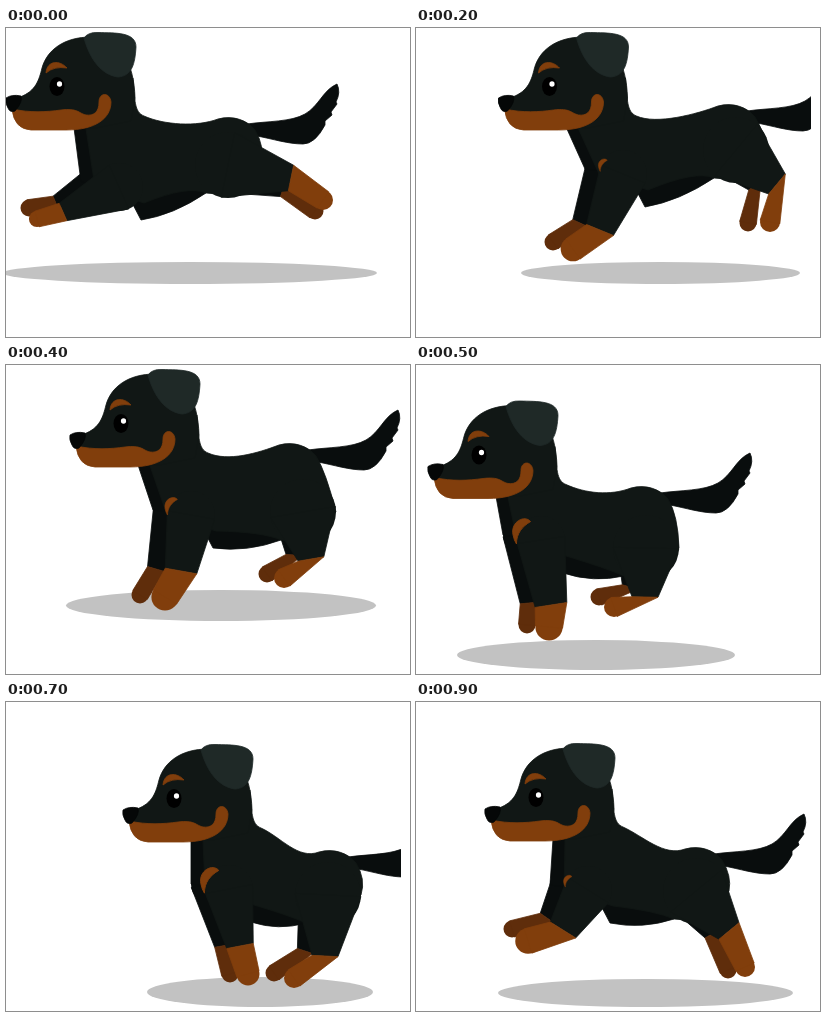
These frames come from a looping animation (404x309 px, 1000 ms). An HTML page with a canvas:

```html
<!DOCTYPE html>
<html lang="en">
<head>
<meta charset="utf-8">
<title>Running puppy</title>
<style>
html, body { margin: 0; width: 100%; height: 100%; overflow: hidden; background: #fff; }
canvas { display: block; }
</style>
</head>
<body>
<canvas id="stage" width="404" height="309"></canvas>
<script>
const ctx = document.getElementById('stage').getContext('2d');
const COAT = '#111715', SHADE = '#090d0d', EAR = '#1f2927', TAN = '#813e0c', DARK_TAN = '#5f2d0b';

// Rigid parts: the face is placed by the head, the tail by the rump.
const FACE = [
  ['M0,71 Q6,67 14,69 C30,63 33,52 36,40 C41,22 58,9 85,9 C115,10 128,35 129,70 L125,93 L90,100 L20,96Z', COAT],
  ['M6,81 Q8,101 25,102 L60,102 C90,102 105,90 105,74 C104,64 93,64 93,74 C93,84 88,88 80,87 C72,85 72,80 55,82 C40,84 25,85 6,81Z', TAN],
  ['M0,70 Q6,66 15,68 Q17,74 9,83 Q4,85 2,80 Q-1,75 0,70Z', '#050707'],
  ['M78,10 Q82,4 92,4.5 C110,5 130,4 130,19 C129,36 126,48 112,49 C96,47 84,32 78,10Z', EAR],
  ['M40,45 C41,32 54,32 61,40 Q48,38 40,45Z', TAN],
];
const TAIL = 'M-6,0 C15,-3 38,-2 52,-10 C66,-18 70,-34 84,-40 Q88,-32 83,-22 l1,2 -6,8 1,3 -7,6 0,4 Q62,20 50,20 C35,20 20,15 4,12Z';
const PATCH = 'M9,-8 C4,-14 -8,-8 -6,3 Q-5,8 -3,11 C-3,2 2,-4 9,-8Z';

// Joints of each key pose; farHand and farFoot shift the far legs from the near ones.
const leap = {
  head: [0, 0], rump: [247, 96], shoulder: [113, 159], hip: [222, 137],
  wrist: [57, 184], hand: [31, 191], farHand: [-8, -11], arm: [9.5],
  ankle: [285, 150], foot: [317, 172], farFoot: [-8, 11],
  shadow: [184, 245, 187, 11], edge: [404],
};
const reach = {
  head: [82.5, 0], rump: [337, 83], shoulder: [207, 146], hip: [320, 122],
  wrist: [184, 202], hand: [157, 221], farHand: [-20, -7], arm: [14.5],
  ankle: [361, 156], foot: [354, 194], farFoot: [-22, 1],
  shadow: [244.5, 245, 139.5, 11], edge: [395],
};
const land = {
  head: [64, 0], rump: [308, 85], shoulder: [185, 150], hip: [297, 147],
  wrist: [175, 206], hand: [159, 232], farHand: [-25, -2], arm: [16],
  ankle: [305, 194], foot: [278, 213], farFoot: [-17, -4],
  shadow: [215, 240.5, 155, 15.5], edge: [404],
};
const stand = {
  head: [12, 31.5], rump: [250, 128], shoulder: [125, 175], hip: [230, 183],
  wrist: [135, 240], hand: [133, 262], farHand: [-22, -2], arm: [16],
  ankle: [229, 232], foot: [198, 242], farFoot: [-15, -10],
  shadow: [180, 290, 139, 15], edge: [404],
};
const gather = {
  head: [75, 35], rump: [311, 151], shoulder: [180, 186], hip: [288, 195],
  wrist: [190, 249], hand: [196, 274], farHand: [-18, -1], arm: [13.5],
  ankle: [267, 247], foot: [236, 269], farFoot: [-14, -4],
  shadow: [221, 290, 139, 14.5], edge: [404],
};
const crouch = {
  head: [117, 38], rump: [348, 155], shoulder: [223, 187], hip: [322, 193],
  wrist: [234, 244], hand: [242, 272], farHand: [-18, 0], arm: [13.5],
  ankle: [319, 254], foot: [288, 276], farFoot: [-20, -5],
  shadow: [254, 290, 113, 15], edge: [395],
};
const spring = {
  head: [69, 37], rump: [304, 152], shoulder: [172, 188], hip: [280, 189],
  wrist: [147, 228], hand: [112, 239], farHand: [-16, -12], arm: [15],
  ankle: [313, 229], foot: [329, 265], farFoot: [-17, 3],
  shadow: [229.5, 291, 147.5, 14], edge: [404],
};

function between(a, b) {
  const mid = {};
  for (const key in a) mid[key] = a[key].map((v, i) => (v + b[key][i]) / 2);
  return mid;
}
const run = [leap, between(leap, reach), reach, between(reach, land), land,
  stand, gather, crouch, between(crouch, spring), spring];

const at = ([x, y], dx, dy) => [x + dx, y + dy];
const add = (a, b) => at(a, ...b);

function paint(path, color, [x, y] = [0, 0], scale = 1) {
  const shape = new Path2D(path);
  ctx.save();
  ctx.translate(x, y);
  ctx.scale(scale, scale);
  ctx.fillStyle = ctx.strokeStyle = color;
  ctx.fill(shape);
  ctx.stroke(shape);
  ctx.restore();
}

function oval([x, y], rx, ry, color) {
  ctx.beginPath();
  ctx.ellipse(x, y, rx, ry, 0, 0, 7);
  ctx.fillStyle = color;
  ctx.fill();
}

// The two ends of a line through p, square to the direction a to b.
function across(p, r, a, b) {
  const turn = Math.atan2(b[1] - a[1], b[0] - a[0]);
  const dx = -Math.sin(turn) * r, dy = Math.cos(turn) * r;
  return [at(p, dx, dy), at(p, -dx, -dy)];
}

function taper([a, b], [c, d], color) {
  paint(`M${a} L${c} L${d} L${b}Z`, color);
}

function limb(root, r, cuff, cuffR, toe, toeR, coat, sock) {
  const hem = across(cuff, cuffR, root, cuff);
  oval(root, r, r, coat);
  taper(across(root, r, root, cuff), hem, coat);
  oval(toe, toeR, toeR, sock);
  taper(hem, across(toe, toeR, cuff, toe), sock);
}

function draw({ head, rump, shoulder, hip, wrist, hand, farHand, arm: [arm],
  ankle, foot, farFoot, shadow: [sx, sy, rx, ry], edge: [edge] }) {
  const h = (x, y) => at(head, x, y), t = (x, y) => at(rump, x, y);
  const s = (x, y) => at(shoulder, x, y), p = (x, y) => at(hip, x, y);

  ctx.clearRect(0, 0, 404, 309);
  ctx.save();
  ctx.beginPath();
  ctx.rect(0, 0, edge, 309);
  ctx.clip();
  ctx.lineWidth = 0.8;
  ctx.lineJoin = 'round';

  oval([sx, sy], rx, ry, '#c2c2c2');
  paint(TAIL, SHADE, rump);

  // Far side, chest and belly
  limb(s(-18, -5), 20, add(wrist, farHand), arm * 0.55, add(hand, farHand), 8.5, SHADE, DARK_TAN);
  limb(p(-6, 4), 24, add(ankle, farFoot), 8, add(foot, farFoot), 8.5, SHADE, DARK_TAN);
  paint(`M${h(68, 100)} L${s(-38, -5)} L${shoulder} L${h(105, 95)}Z`, SHADE);
  const sag = [(shoulder[0] + hip[0]) / 2, (shoulder[1] + hip[1]) / 2 + 39];
  paint(`M${s(10, 10)} L${s(22, 33)} Q${sag} ${p(-22, 28)} L${hip}Z`, SHADE);

  // Near side
  paint(`M${h(127, 50)} C${h(129, 72)} ${h(128, 84)} ${h(138, 88)}
    C${h(158, 97)} ${t(-56, 3)} ${t(-35, -5)} C${t(-20, -9)} ${t(-6, -4)} ${t(2, 6)}
    Q${t(12, 22)} ${p(33, 0)} L${p(0, 30)} L${p(-22, 28)} Q${p(-40, 20)} ${s(25, 16)}
    L${s(-24, 0)} L${h(80, 101)} L${h(95, 60)}Z`, COAT);
  limb(hip, 33, ankle, 13, foot, 10, COAT, TAN);
  limb(shoulder, 24, wrist, arm, hand, arm * 0.85, COAT, TAN);
  // The chest patch folds away as the arm swings forward.
  paint(PATCH, TAN, s(-21, -9), Math.max(0, 1 - (shoulder[0] - wrist[0]) / 56));

  for (const [path, color] of FACE) paint(path, color, head);
  oval(h(51, 58.5), 7.5, 9.5, '#000');
  oval(h(53.5, 56), 2.6, 2.8, '#fff');
  ctx.restore();
}

function tick() {
  draw(run[Math.floor(performance.now() / 100) % run.length]);
  requestAnimationFrame(tick);
}
tick();
</script>
</body>
</html>
```
